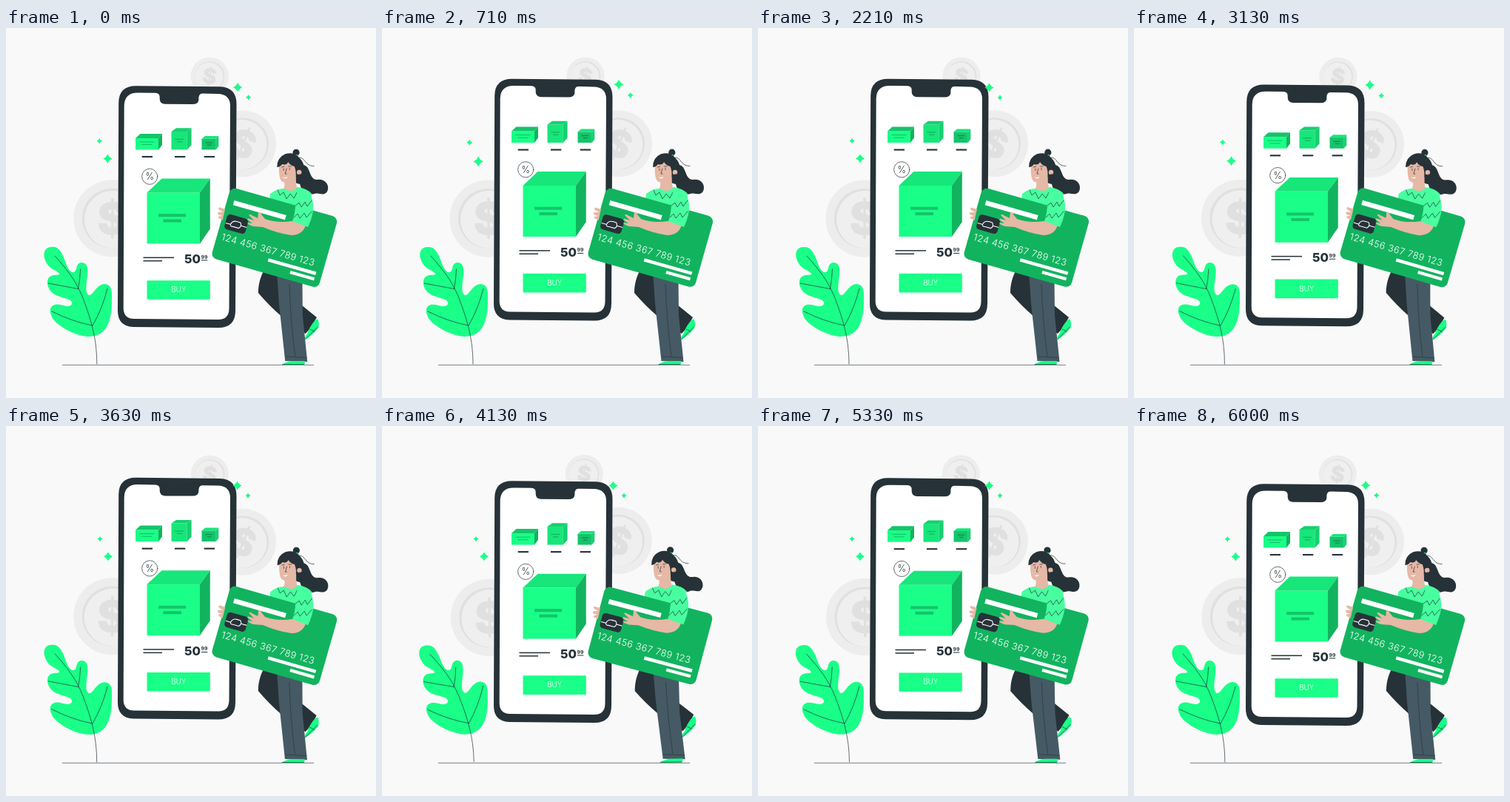
These frames come from a looping animation (500 by 500 pixels, 6.04 s). An HTML page:

```html
<!DOCTYPE html>
<html lang="en">
<head>
<meta charset="utf-8">
<title>Mobile checkout</title>
<style>
  html, body { margin: 0; width: 100%; height: 100%; overflow: hidden; background: #f9f9f9; }
  svg { display: block; width: 100vw; height: 100vh; }
  text { font-family: Inter, "Open Sans", sans-serif; }
  .dark { fill: #263238; }
  .main { fill: #19ff87; }
  .deep { fill: #12b35f; }
  .skin { fill: #e6b8a6; }
  .shirt { fill: #47ff9f; }
  .white { fill: #fff; }
  .line { fill: none; stroke: #263238; stroke-width: .7; stroke-linecap: round; stroke-linejoin: round; }
</style>
</head>
<body>
<svg viewBox="0 0 500 500">
  <path d="M76 455.4 H416" stroke="#263238" stroke-width=".6"/>
  <g id="coins"></g>

  <g id="phone">
    <path class="dark" d="M176 78.2 L289 79.3 Q311.5 80 311.5 103 L310 382 Q310 405 287 405 L172 404 Q150.6 403 151 381 L152.2 101 Q152.5 78 176 78.2Z"/>
    <path class="white" d="M178 87.5 L202 87.8 Q207.5 88 207.7 93 V96 Q208 102.6 215 102.8 L252 103 Q260 103 260.4 97 V94 Q261 88.5 266 88.6 L286 89 Q303.2 89.3 303 106 L301.5 379 Q301.2 394 287 394 L173 393 Q158.4 392.5 158.7 378 L159.7 105 Q160 87.5 178 87.5Z"/>
    <g id="boxes"></g>
    <g class="dark">
      <rect x="183.7" y="173" width="14.3" height="2.1"/>
      <rect x="228" y="173" width="14.3" height="2.1"/>
      <rect x="267.7" y="173" width="14.3" height="2.1"/>
      <rect x="185.5" y="309.6" width="41.5" height="1.5"/>
      <rect x="185.5" y="314" width="25.5" height="1.5"/>
      <rect x="264" y="313.4" width="8.3" height="1"/>
      <text x="241" y="318" font-size="16.6" font-weight="800">50</text>
      <text x="263.6" y="311.8" font-size="6.8" font-weight="700">99</text>
      <text x="194.3" y="205.3" font-size="12.4" font-weight="300" text-anchor="middle">%</text>
    </g>
    <circle class="line" cx="194.2" cy="200.8" r="10.6"/>
    <rect class="main" x="190.5" y="341.3" width="85.3" height="25.6" rx="1"/>
    <text class="white" x="233.2" y="357.3" font-size="9.8" font-weight="300" text-anchor="middle">BUY</text>
  </g>

  <g id="stars" class="main"></g>

  <g id="plant">
    <path class="main" d="M62 296 C70 295 74 302 77 308 C81 317 84 330 91 330 C97 329 93 319 101 317 C110 316 111 325 110 334 C109 344 106 358 112 361 C118 362 121 347 133 346 C145 346 143 361 143 371 C143 388 139 404 130 411 C123 417 112 418 104 416 C90 413 74 405 65 395 C59 387 57 376 66 374 C74 372 85 380 89 373 C90 366 80 366 73 363 C62 360 55 352 56 342 C58 330 72 336 72 332 C70 328 62 327 57 321 C52 314 50 308 52 302 C54 297 58 296 62 296Z"/>
    <path class="line" d="M66 308 C82 326 95 342 104 365 C115 394 123 420 123 454 M97.5 352.5 L57 345 M97.5 352.5 Q100 340 100.5 326 M117 402 Q130 380 137 352 M117 402 Q90 397 62 383"/>
  </g>

  <g id="shopper">
    <path class="dark" d="M350 325 C343 337 341 348 341 358 Q370 392 405 413 Q413 405 420 391 L399 374 V338Z"/>
    <path class="main" d="M408 412 C409 407 417 393 421.5 393.5 Q424 398 422.5 405 Q415 415 405 421 Q402 420 408 412Z"/>
    <path class="line" d="M405 420.5 Q414 411 421.5 404 M411 407 L417 410"/>
    <path d="M366 328 L369 372 L377.5 450 L407.5 451 L401 388 L400.5 338Z" fill="#455a64"/>
    <path d="M378 444 L407 445.5 M383 346 Q385 400 391 444" fill="none" stroke="#263238" stroke-width=".6"/>
    <path class="main" d="M373 455.3 Q376 452 386 450 H404 Q405 453 403 455.3Z"/>
    <path class="line" d="M374 454.5 H403"/>

    <path class="dark" d="M380 174 C390 168 400 176 402 185 C409 187 409 194 413 201 C418 208 422 203 428 205.5 C435 208 437 217 433 222 C428 227 423 222 417 224 C408 227 399 221 397 211 L386 208Z"/>
    <circle class="dark" cx="391.8" cy="168.2" r="4.6"/>
    <path d="M388 172.5 Q391 170.5 395 172.5" fill="none" stroke="#19ff87" stroke-width="1.2"/>
    <path class="shirt" d="M357 224 Q366 217 375 217 L394 215 Q407 217 413 224 L404 265 L355 240Z"/>
    <path class="skin" d="M375 203 L392 195 Q391 208 393 216 Q386 224 375 217 Q377 213 376 208Z"/>
    <path class="skin" d="M369 184 Q368 195 370 203 Q372 210 379 208 Q389 207 393 196 L393 181 L378 177Z"/>
    <path class="dark" d="M366 188 Q366 175 377 170.3 Q387 167 394 173 Q401 181 399 190 L397 200 L391.5 201 Q392 193 389.5 187 Q384 186 381 181 Q379 186 373 184 Q370 188 366 188Z"/>
    <circle class="skin" cx="396" cy="195" r="3.2"/>
    <circle class="line" cx="397" cy="199.5" r="2"/>
    <path class="line" d="M395 175 C405 174 403 187 416 186.5"/>
    <path class="line" d="M375 190 V192.5 M383 189.5 V191.5 M379 190 L377 197 L379 197 M372.5 188 L375.5 187.3 M381.5 187 L385 187"/>
    <path class="white" d="M373 201 Q377 203 380.5 200.5 Q378 206 373 201Z"/>
    <path class="line" d="M367 219 L370 226 L375 222 L379 231 L384 224 L389 230 L393 222 L399 224 L398 217"/>

    <g transform="translate(362.8 283.3) rotate(15.8)">
      <rect class="deep" x="-75.5" y="-49.7" width="151" height="99.4" rx="8"/>
      <g class="white">
        <rect x="-66" y="-33.5" width="73" height="6.5"/>
        <rect x="0" y="29" width="67" height="4.5"/>
        <rect x="33" y="37" width="34" height="4.2"/>
        <text x="-69" y="22.5" font-size="12.7" font-weight="300" letter-spacing=".4">124 456 367 789 123</text>
      </g>
      <rect class="dark" x="-69.5" y="-14" width="29.5" height="21" rx="4.5"/>
      <path d="M-69 -1 H-62 Q-61 -7 -55 -7 H-50 Q-46 -3 -50 1 H-58 Q-62 2 -62 -1 M-48 -3 H-40" fill="none" stroke="#fff" stroke-width="1.1"/>
    </g>

    <path class="skin" d="M296 245 L288 242.5 Q286 244 288 246 L293 249 L286.5 249 Q285 251 287 252.5 L292 254 L287 255 Q286 257 289 258 L292.5 260Z"/>
    <path class="skin" d="M406 262 C404 275 396 280 385 280 Q366 277 347 269 L334 268 Q327 266 326 263 L333 264 L326 259 Q326 257 329 258 L335 260 L328 253 Q329 251 332 253 L340 257 L341 249 Q344 248 345 252 L350 258 Q366 264 386 261Z"/>
    <path class="shirt" d="M394 216 Q411 217 414 233 Q418 247 408 269 L387 261 Q391 250 391 236Z"/>
    <path class="line" d="M391 240 L396 236 L399 242 L404 235 L407 241 L413 233 M389 256 L394 251 L397 257 L403 250 L406 256 L413 248"/>
  </g>
</svg>
<script>
  const byId = id => document.getElementById(id);
  const TINT = { main: '#19ff87', light: '#17e67a', soft: '#16d071', mid: '#14c46a', deep: '#12b35f' };

  // Coin: disc, shaded inner rim, face shifted off the shade, and sign
  const coin = (x, y, r, size, tilt, shift) => `
    <circle cx="${x}" cy="${y}" r="${r}" fill="#ededed"/>
    <circle cx="${x}" cy="${y}" r="${r * .78}" fill="#e0e0e0"/>
    <circle cx="${x + r * shift}" cy="${y + r * .025}" r="${r * .75}" fill="#efefef"/>
    <text x="${x}" y="${y + size * .36}" font-size="${size}" font-weight="900" text-anchor="middle"
      fill="#e0e0e0" transform="rotate(${tilt} ${x} ${y})">$</text>`;

  // Box: front rectangle, back edge of the lid, and lower corner of the side
  const box = (x, y, w, h, back, lid, end, low, [front, top, side]) => `
    <rect x="${x}" y="${y}" width="${w}" height="${h}" fill="${front}"/>
    <path d="M${x} ${y} L${back} ${lid} H${end} L${x + w} ${y}Z" fill="${top}"/>
    <path d="M${x + w} ${y} L${end} ${lid} V${low} L${x + w} ${y + h}Z" fill="${side}"/>`;

  const bar = (x, y, w, h, fill = TINT.deep) =>
    `<rect x="${x}" y="${y}" width="${w}" height="${h}" fill="${fill}"/>`;

  const star = (x, y, r) => {
    const k = r * .27;
    return `<path d="M${x} ${y - r} Q${x + k} ${y - k} ${x + r} ${y} Q${x + k} ${y + k} ${x} ${y + r}
      Q${x - k} ${y + k} ${x - r} ${y} Q${x - k} ${y - k} ${x} ${y - r}Z"/>`;
  };

  byId('coins').innerHTML =
    coin(143.5, 257.5, 52, 60, 0, .03) + coin(320, 156.3, 45, 51, 22, -.03) + coin(275, 65, 25.6, 29, 9, -.03);

  const { main, light, soft, mid, deep } = TINT;
  byId('boxes').innerHTML =
    box(175, 149, 31, 15.5, 181.5, 143, 211, 158, [main, mid, deep]) +
    bar(180.5, 153.6, 20, .9) + bar(183.5, 157.2, 14, .9) +
    box(223.5, 140, 21.3, 24.5, 230, 135.3, 250.6, 158, [light, soft, soft]) +
    bar(228.5, 149.8, 11.5, 1.2) + bar(231, 153.2, 7, 1.2) +
    box(264.5, 149.8, 19.3, 14.7, 269, 146, 287.3, 160, [mid, light, soft]) +
    bar(269.5, 154.5, 9.5, 1.1, '#0d8a49') + bar(272, 157.6, 5.5, 1.1, '#0d8a49') +
    box(190.5, 222.5, 71.5, 69, 210.5, 203.6, 275.8, 271.5, [main, light, deep]) +
    bar(206, 251.2, 37, 4, mid) + bar(212.5, 258.6, 24.5, 4, mid);

  byId('stars').innerHTML =
    star(312.5, 80.5, 6.3) + star(327, 94, 3.7) + star(138, 176.2, 6.3) + star(127, 152.6, 3.7);

  const LOOP = 6040, STEP = 1000 / 24, LAST = 144, SWAY = 1500, BEAT = 6000;

  // Linear interpolation through [position, value] pairs
  const track = (keys, p) => {
    const i = Math.max(1, keys.findIndex(([at]) => at >= p));
    const [p0, v0] = keys[i - 1], [p1, v1] = keys[i];
    return v0 + (v1 - v0) * (p - p0) / (p1 - p0);
  };
  const FLOAT = [[0, .5], [.5, -9.5], [1, .5]];
  const WIND = [[0, 0], [.25, 1], [.75, -1], [1, 0]];
  const PULSE = [[0, 1], [.1, 1.1], [.3, 1], [.4, 1], [.5, 1.1], [.6, 1], [1, 1]];

  const place = (id, value) => byId(id).setAttribute('transform', value);

  function draw(ms) {
    // The motion runs at 24 steps a second and begins one step in
    const t = (Math.min(LAST, Math.floor((ms % LOOP + 5) / STEP)) + 1) * STEP;
    const sway = t % SWAY / SWAY;
    const angle = track(WIND, sway);
    const scale = track(PULSE, t % BEAT / BEAT);
    place('phone', `translate(0 ${track(FLOAT, sway)})`);
    place('coins', `rotate(${angle} 228 174.5)`);
    place('plant', `rotate(${angle} 97 375)`);
    place('shopper', `rotate(${angle} 363 310)`);
    place('stars', `translate(227 128) scale(${scale}) translate(-227 -128)`);
  }

  const start = performance.now();
  function tick() {
    draw(performance.now() - start);
    requestAnimationFrame(tick);
  }
  draw(0);
  requestAnimationFrame(tick);
</script>
</body>
</html>
```
